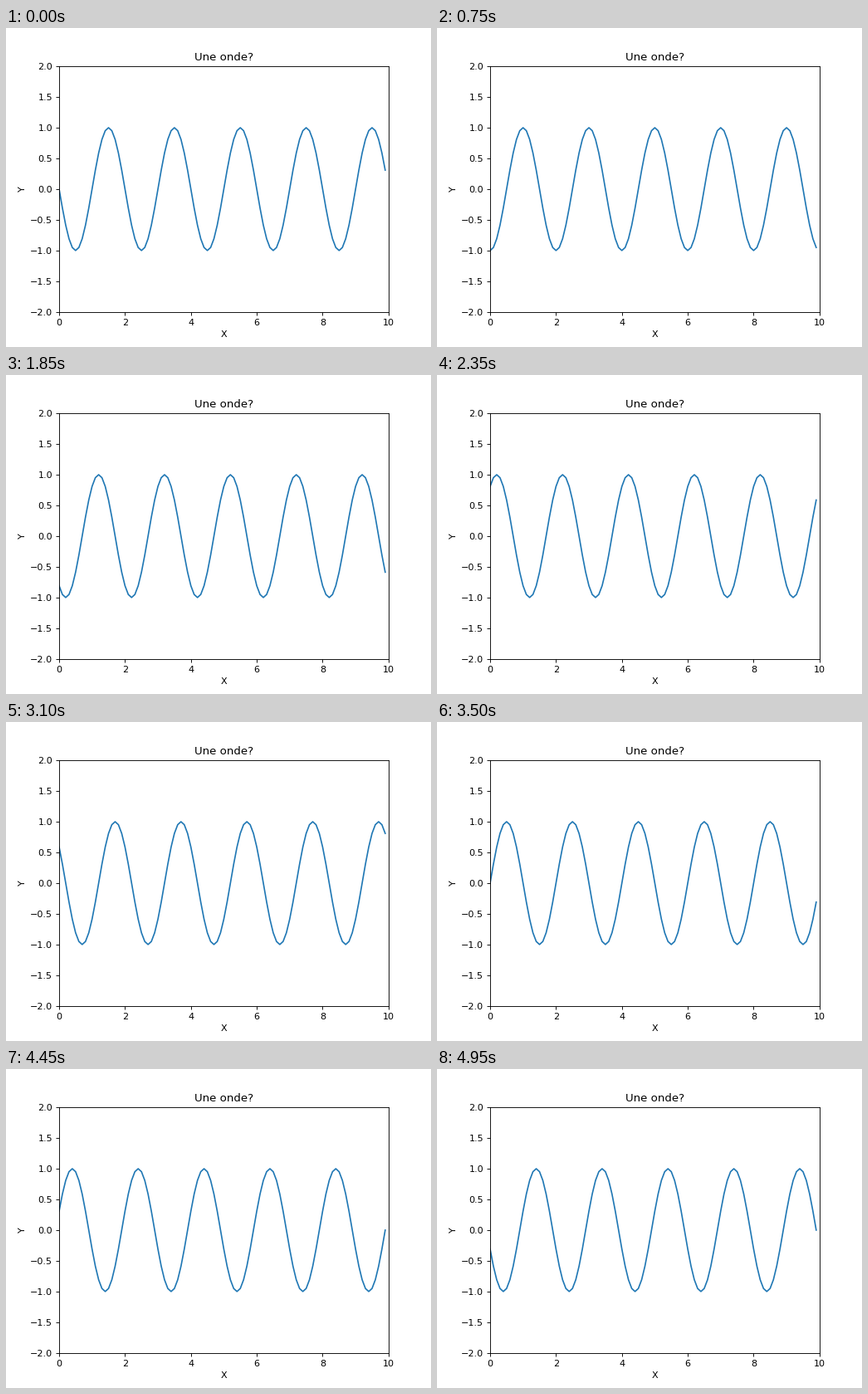
A matplotlib script that plays this animation: 512x384 px, repeating every 5000 ms.

```python
import numpy as np
import matplotlib.pyplot as plt
from matplotlib.animation import FuncAnimation

FRAMES = 100
INTERVAL = 50  # ms
WAVELENGTH = 2.0
STEP = 0.1  # distance travelled per frame

x = np.arange(100) * 0.1

fig, ax = plt.subplots(figsize=(6.4, 4.8), dpi=80)
line, = ax.plot([], [])
ax.set_xlim(0, 10)
ax.set_ylim(-2, 2)
ax.set_title("Une onde?")
ax.set_xlabel("X")
ax.set_ylabel("Y")


def update(i):
    line.set_data(x, np.sin(2 * np.pi * (STEP * i - x) / WAVELENGTH))
    return line,


anim = FuncAnimation(fig, update, frames=FRAMES, interval=INTERVAL,
                     repeat=True, repeat_delay=0, blit=False)
plt.show()
```
